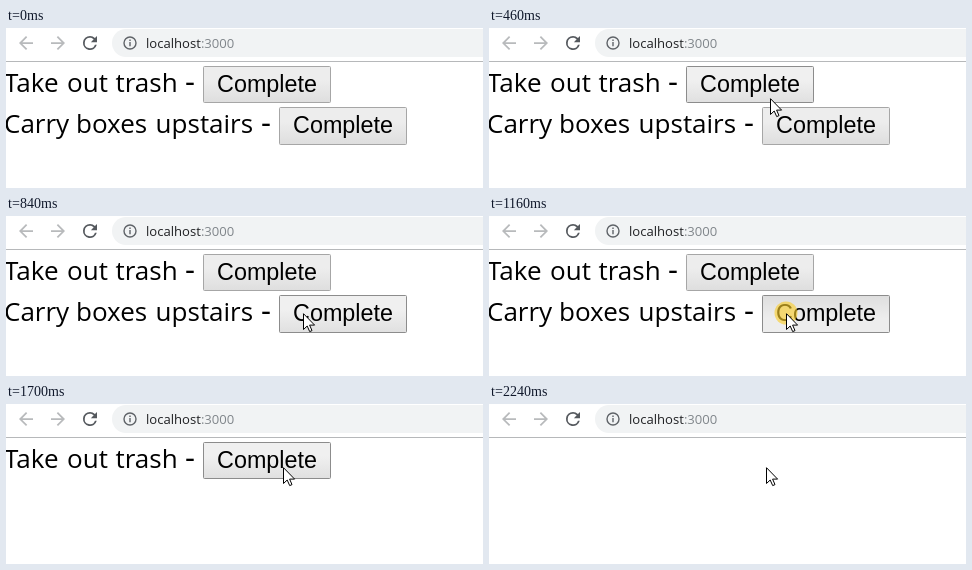
These frames come from a looping animation (477x160 px, 2.39 s). An HTML page:

```html
<!DOCTYPE html>
<html lang="en">
<head>
<meta charset="utf-8">
<title>Task list</title>
<style>
  html, body { margin: 0; width: 100%; height: 100%; overflow: hidden; background: #fff; }
  svg { display: block; width: 477px; height: 160px; }
  .url { font: 13.1px "Open Sans", sans-serif; fill: #202124; }
  .url .port { fill: #80868b; }
  .label { font: 26px "Open Sans", sans-serif; }
  .label .dash { font-size: 31px; }
  .button text { font: 23.33px "Liberation Sans", Arial, sans-serif; text-anchor: middle; }
  .button rect { fill: url(#normal); stroke: #a6a6a6; }
  .button.hover rect { fill: url(#hover); stroke: #8c8c8c; }
  .button.pressed rect { fill: url(#pressed); stroke: #8c8c8c; }
</style>
</head>
<body>
<svg viewBox="0 0 477 160">
  <defs>
    <linearGradient id="normal" x2="0" y2="1">
      <stop offset=".38" stop-color="#ededed"/><stop offset="1" stop-color="#dedede"/>
    </linearGradient>
    <linearGradient id="hover" x2="0" y2="1">
      <stop offset=".38" stop-color="#f0f0f0"/><stop offset="1" stop-color="#e0e0e0"/>
    </linearGradient>
    <linearGradient id="pressed" x2="0" y2="1">
      <stop offset="0" stop-color="#dedede"/><stop offset=".62" stop-color="#ededed"/>
    </linearGradient>
    <path id="arrow" d="M8 -1H-4.17l5.59-5.59L0-8l-8 8 8 8 1.41-1.41L-4.17 1H8z"/>
  </defs>

  <!-- Toolbar -->
  <rect x="106" y="1" width="400" height="28" rx="14" fill="#f1f3f4"/>
  <use href="#arrow" transform="translate(20 15) scale(.875)" fill="#b8babc"/>
  <use href="#arrow" transform="translate(52 15) scale(-.875 .875)" fill="#b8babc"/>
  <path transform="translate(73.5 4.5) scale(.875)" fill="#55595e"
    d="M17.65 6.35A7.96 7.96 0 0 0 12 4a8 8 0 1 0 7.73 10h-2.08A6 6 0 1 1 12 6c1.66 0 3.14.69 4.22 1.78L13 11h7V4z"/>
  <g fill="none" stroke="#5f6368" stroke-width="1.4">
    <circle cx="124" cy="15" r="6"/>
    <path d="M124 14v4.3M124 11.4v1.5"/>
  </g>
  <text class="url" x="140" y="20">localhost<tspan class="port">:3000</tspan></text>
  <rect y="33" width="477" height="1" fill="#b6b8ba"/>

  <g id="rows"></g>
  <circle id="ring" r="11.5"/>
  <path id="cursor" fill="#fff" stroke="#000" stroke-linejoin="miter"
    d="M.5 .7V16.5L4.2 13L6.7 18.6L9 17.6L6.6 12.1H11.6z"/>
</svg>
<script>
const DURATION = 2390;

// words: [text, x]; the row leaves at `gone`
const tasks = [
  { words: [["Take", -2], ["out", 61], ["trash", 109.6]], dash: 179,
    x: 197, y: 38, height: 37, baseline: 64, gone: 2240 },
  { words: [["Carry", -2], ["boxes", 70], ["upstairs", 149.6]], dash: 255,
    x: 273, y: 79, height: 38, baseline: 105, gone: 1240 }
];
const BUTTON_WIDTH = 128;

// [time, x, y] of the pointer tip
const pointer = [
  [150, 263, 148], [230, 269, 120], [310, 275, 95], [380, 279, 79],
  [460, 281, 70], [530, 281, 66], [610, 281, 64],
  [690, 285, 73], [760, 292, 87], [840, 297, 97],
  [1480, 295, 91], [1540, 289, 80], [1620, 281, 68], [1700, 277, 63]
];

const clicks = [
  { from: 1160, to: 1240, color: "rgba(250, 205, 40, .62)" },
  { from: 2080, to: 2240, color: "rgba(250, 238, 10, .66)" }
];

const byId = id => document.getElementById(id);
const show = (node, on) => { node.style.display = on ? "" : "none"; };
const place = (node, x, y) => node.setAttribute("transform", `translate(${x} ${y})`);

byId("rows").innerHTML = tasks.map(({ words, dash, x, y, height, baseline }) => `
  <g class="row">
    <text class="label" y="${baseline}">
      ${words.map(([word, left]) => `<tspan x="${left}">${word}</tspan>`).join("")}
      <tspan class="dash" x="${dash}">-</tspan>
    </text>
    <g class="button">
      <rect x="${x + .5}" y="${y + .5}" width="${BUTTON_WIDTH - 1}" height="${height - 1}" rx="1"/>
      <text x="${x + BUTTON_WIDTH / 2}" y="${baseline}">Complete</text>
    </g>
  </g>`).join("");

const rows = [...document.querySelectorAll(".row")];
const buttons = [...document.querySelectorAll(".button")];
const cursor = byId("cursor");
const ring = byId("ring");

function draw(time) {
  const step = pointer.filter(([start]) => start <= time).pop();
  const click = clicks.find(({ from, to }) => time >= from && time < to);
  const [, px, py] = step || [0, -99, -99];

  show(cursor, step);
  place(cursor, px, py);
  show(ring, click);
  place(ring, px, py);
  if (click) ring.setAttribute("fill", click.color);

  tasks.forEach(({ x, y, height, gone }, i) => {
    const over = px >= x && px < x + BUTTON_WIDTH && py >= y && py < y + height;
    show(rows[i], time < gone);
    buttons[i].classList.toggle("hover", over);
    buttons[i].classList.toggle("pressed", Boolean(over && click));
  });
}

const start = performance.now();
function tick() {
  draw((performance.now() - start) % DURATION);
  requestAnimationFrame(tick);
}
tick();
</script>
</body>
</html>
```
